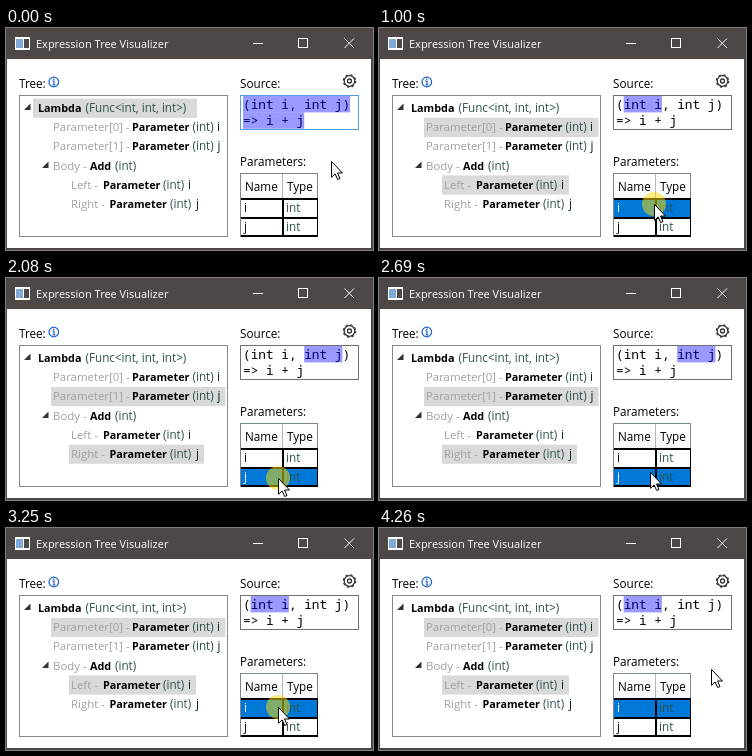
An HTML page for the animation above (4800 ms loop, 367 by 222 pixels).

```html
<!DOCTYPE html>
<html lang="en">
<head>
<meta charset="utf-8">
<title>Expression Tree Visualizer</title>
<style>
  html, body { margin: 0; width: 100%; height: 100%; overflow: hidden; background: #fff; }
  svg { display: block; }
  text { font: 11.7px "Open Sans", "Noto Sans", sans-serif; white-space: pre; }
  .title { font-size: 11px; fill: #fff; }
  .bold { font-size: 10.8px; font-weight: 700; }
  .path { font-size: 11.4px; fill: #a0a0a0; }
  .type { fill: #2f4f4f; }
  .name { fill: #002800; }
  .code { font: 12.75px "Noto Sans Mono", "DejaVu Sans Mono", monospace; }
</style>
</head>
<body>
<svg id="stage" width="367" height="222" viewBox="0 0 367 222">
  <defs>
    <linearGradient id="hot" x2="0" y2="1">
      <stop offset=".4" stop-color="#e3f7ff"/><stop offset=".41" stop-color="#bdedff"/>
      <stop offset="1" stop-color="#b7e7fb"/>
    </linearGradient>
    <linearGradient id="plain" x2="0" y2="1">
      <stop offset=".4" stop-color="#fff"/><stop offset="1" stop-color="#f5f6f8"/>
    </linearGradient>
  </defs>
</svg>
<script>
const LOOP = 4800;
const CHAR = 7.65;
const ROW = 19.2;
const stage = document.getElementById("stage");

function add(tag, attrs, content = "") {
  const el = document.createElementNS("http://www.w3.org/2000/svg", tag);
  for (const key in attrs) el.setAttribute(key, attrs[key]);
  el.textContent = content;
  stage.append(el);
  return el;
}
const rect = (x, y, width, height, fill) => add("rect", { x, y, width, height, fill });
const frame = (x, y, w, h, stroke) =>
  add("rect", { x: x + .5, y: y + .5, width: w - 1, height: h - 1, fill: "none", stroke });
const line = (d, stroke, width = 1) => add("path", { d, stroke, "stroke-width": width, fill: "none" });
const circle = (cx, cy, r, attrs) => add("circle", { cx, cy, r, ...attrs });
const label = (x, y, text, cls = "") => add("text", { x, y, class: cls }, text);
const show = (el, on) => el.setAttribute("visibility", on ? "visible" : "hidden");

// Window chrome
rect(0, 0, 367, 222, "#4d4845");
rect(1, 31, 364, 189, "#fff");
rect(9, 9, 15, 13, "#fff");
rect(10, 11, 7, 9, "#7fa9d6");
rect(18, 11, 5, 9, "#4d4845");
label(30, 19.5, "Expression Tree Visualizer", "title");
line("M247 15.5h10", "#fff");
frame(292, 10, 10, 10, "#fff");
line("M338.5 10.5l9.5 9.5m0 -9.5l-9.5 9.5", "#fff");

// Labels and icons
label(13, 59.5, "Tree:");
circle(47.8, 54, 4.8, { fill: "#fff", stroke: "#1c62c4", "stroke-width": 1.2 });
line("M46.3 53h1.7v4m-1.5 0h3M47.8 50.5v1.4", "#1c62c4", 1.2);
label(234, 59.5, "Source:");
circle(343.5, 53, 5.3, { fill: "none", stroke: "#333", "stroke-width": 1.2 });
circle(343.5, 53, 6.2, {
  fill: "none", stroke: "#333", "stroke-width": 1.2, "stroke-dasharray": "2.4 2.47"
});
circle(343.5, 53, 2, { fill: "none", stroke: "#333", "stroke-width": 1.3 });
label(234, 137.5, "Parameters:");

// Tree
frame(13, 67, 209, 142, "#828790");
const bar = (x, row, right) => rect(x, 70.6 + row * ROW, right - x, ROW, "#d9d9d9");
const treeBars = {
  all: [bar(27, 0, 191)],
  i: [bar(45, 1, 219.5), bar(63, 4, 190)],
  j: [bar(45, 2, 219.5), bar(63, 5, 198)]
};

function treeRow(row, pathX, path, boldX, kind, typeX, type, nameX, name) {
  const y = 84 + row * ROW;
  label(pathX, y, path, "path");
  label(boldX, y, kind, "bold");
  label(typeX, y, type, "type");
  if (name) label(nameX, y, name, "name");
}
treeRow(0, 32, "", 32, "Lambda", 79.5, "(Func<int, int, int>)");
treeRow(1, 47, "Parameter[0] -", 126, "Parameter", 186.5, "(int)", 211, "i");
treeRow(2, 47, "Parameter[1] -", 126, "Parameter", 186.5, "(int)", 211.5, "j");
treeRow(3, 47, "Body -", 84, "Add", 109, "(int)");
treeRow(4, 65, "Left -", 97, "Parameter", 157, "(int)", 182, "i");
treeRow(5, 65, "Right -", 103.5, "Parameter", 164, "(int)", 190, "j");
for (const [x, y] of [[24.5, 75.5], [42.5, 133.5]])
  add("path", { d: `M${x} ${y}v6.5h-6.5z`, fill: "#333" });

// Source box; the selection tint lies over the text
const sourceFrame = frame(234, 67, 119, 35, "#707070");
label(237, 81, "(int i, int j)", "code");
label(237, 97, "=> i + j", "code");
const mark = (start, count, row = 0) =>
  rect(237 + start * CHAR, 68 + row * 16.4, count * CHAR, 16.4, "rgba(0, 0, 255, .4)");
const sourceMarks = { all: [mark(0, 14), mark(0, 8, 1)], i: [mark(1, 5)], j: [mark(8, 5)] };

// Parameter table
rect(235, 146, 76, 24, "url(#plain)");
const hotHeader = rect(277, 146, 34, 24, "url(#hot)");
const hotEdge = frame(276, 145, 36, 26, "#69bbe3");
label(239, 163, "Name");
label(281, 163, "Type");
const tableRows = ["i", "j"].map((name, k) => ({
  name,
  fill: rect(235, 171 + k * 19, 76, 18, "#0078d7"),
  text: label(238, 184 + k * 19, name),
  type: label(280, 184 + k * 19, "int", "type")
}));
frame(234, 145, 78, 64, "#7d8794");
line("M276.5 146v24", "#b4b8be");
line("M235 171h77M235 190h77M235 208h77M277 170v38", "#000", 2);
line("M311.5 170v38", "#000");

// Pointer
const halo = circle(0, 0, 12, { fill: "#ffe100", opacity: .5 });
const pointer = add("path", {
  d: "M.5 .5V16.3L4.1 12.9L6.7 18.5L9 17.5L6.5 12H11.5Z",
  fill: "#fff", stroke: "#000", "stroke-width": 1
});

// time, x, y
const moves = [
  [0, 325, 133], [360, 320, 138], [440, 309, 149], [520, 296, 161], [600, 285, 170],
  [670, 280, 174], [750, 276, 176], [840, 275, 176],
  [1370, 274, 183], [1450, 273, 193], [1530, 272, 200],
  [2690, 271, 194], [2780, 271, 186], [2860, 272, 180], [3010, 272, 179],
  [3570, 278, 175], [3630, 288, 167], [3710, 302, 158], [3790, 314, 152],
  [3860, 323, 148], [3940, 329, 146], [4020, 331, 145],
  [4110, 331, 143], [4190, 332, 142], [4260, 332, 141]
];
const clicks = [[1000, 1140, "i"], [2080, 2230, "j"], [3250, 3400, "i"]];

function render(t) {
  const [, x, y] = moves.findLast(([start]) => t >= start);
  const click = clicks.findLast(([start]) => t >= start);
  const selected = click ? click[2] : "all";

  for (const group of [treeBars, sourceMarks])
    for (const key in group) group[key].forEach(el => show(el, key === selected));
  sourceFrame.setAttribute("stroke", selected === "all" ? "#569de5" : "#707070");
  for (const row of tableRows) {
    show(row.fill, row.name === selected);
    row.text.setAttribute("fill", row.name === selected ? "#fff" : "#000");
  }

  const hot = x >= 277 && x < 311 && y >= 146 && y < 170;
  show(hotHeader, hot);
  show(hotEdge, hot);
  show(halo, click && t < click[1]);
  const place = `translate(${x} ${y})`;
  halo.setAttribute("transform", place);
  pointer.setAttribute("transform", place);
}

function tick() {
  render(performance.now() % LOOP);
  requestAnimationFrame(tick);
}
tick();
</script>
</body>
</html>
```
